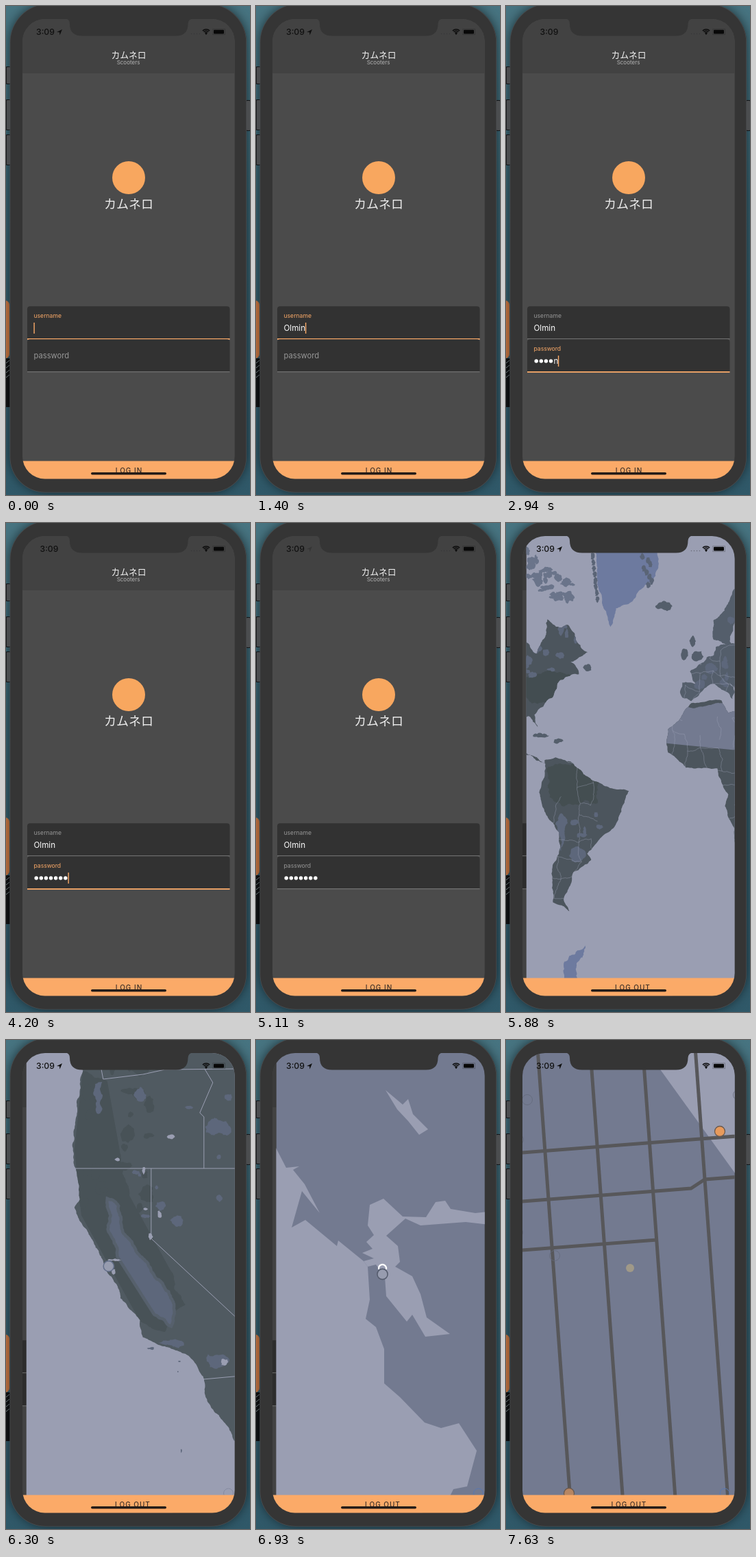
Recreate the animation shown at these times as an HTML page with a canvas. Size 356 by 712 pixels, loop 7700 ms.

```html
<!DOCTYPE html>
<html lang="en">
<head>
<meta charset="utf-8">
<title>Scooter login</title>
<style>
html, body { margin: 0; width: 100%; height: 100%; overflow: hidden; background: #345c69; }
canvas { display: block; width: 356px; height: 712px; }
</style>
</head>
<body>
<canvas id="stage"></canvas>
<script>
const LOOP = 7700, STEP = 70;
const BRAND = 'カムネロ', USER = 'Olmin', PASS = USER + '12';
const UI = 'Inter, Roboto, sans-serif', JP = '"Noto Sans CJK JP", "Noto Sans CJK", sans-serif';
const ORANGE = '#fbaa68', SEA = '#9a9eb2', HAZE = '#737a90', ICE = '#6d7a9f';
const LAND = '#4c555d', MOSS = '#485257', HILL = '#5d677b', BEZEL = '#353535';

const canvas = document.getElementById('stage');
const ratio = window.devicePixelRatio || 1;
canvas.width = 356 * ratio;
canvas.height = 712 * ratio;
const g = canvas.getContext('2d');

// ---------- helpers ----------
const clamp = v => Math.max(0, Math.min(1, v));
const ramp = (t, a, b) => clamp((t - a) / (b - a));
const easeOut = u => 1 - Math.pow(1 - u, 3);
const range = (n, f) => Array.from({ length: n }, (_, i) => f(i));

function track(t, keys) {
  const i = Math.max(1, keys.findIndex(k => t < k[0]));
  const [a, from] = keys[i - 1], [b, to] = keys[i];
  return t >= keys.at(-1)[0] ? keys.at(-1)[1] : from + (to - from) * ramp(t, a, b);
}

function box(x, y, w, h, color, r = 0) {
  g.fillStyle = color;
  g.beginPath();
  g.roundRect(x, y, w, h, r);
  g.fill();
}

function dot(x, y, r, color, edge, width = 1) {
  g.beginPath();
  g.arc(x, y, r, 0, 7);
  if (color) { g.fillStyle = color; g.fill(); }
  if (edge) { g.strokeStyle = edge; g.lineWidth = width; g.stroke(); }
}

function text(s, x, y, size, color, { align = 'left', weight = 400, font = UI, gap = 0 } = {}) {
  g.font = `${weight} ${size}px ${font}`;
  g.letterSpacing = gap + 'px';
  g.textAlign = align;
  g.fillStyle = color;
  g.fillText(s, x, y);
  g.letterSpacing = '0px';
  return g.measureText(s).width;
}

const fill = (path, color) => { g.fillStyle = color; g.fill(path); };
function stroke(path, color, width) {
  g.strokeStyle = color;
  g.lineWidth = width;
  g.stroke(path);
}
function inside(path, draw) {
  g.save();
  g.clip(path);
  draw();
  g.restore();
}

// ---------- map shapes ----------
let seed = 90210;
const rnd = () => (seed = seed * 16807 % 2147483647) / 2147483647;
const spread = r => (rnd() - .5) * 2 * r;

// Midpoint displacement turns a side into a coast; long off-stage sides stay straight.
function jag([x, y], [u, v], rough) {
  const dx = u - x, dy = v - y, len = Math.hypot(dx, dy);
  if (!rough || len < 3 || len > 90) return [[x, y]];
  const k = spread(rough), mid = [x + dx / 2 - dy * k, y + dy / 2 + dx * k];
  return [...jag([x, y], mid, rough), ...jag(mid, [u, v], rough)];
}
function outline(pts, rough) {
  const all = pts.flatMap((p, i) => jag(p, pts[(i + 1) % pts.length], rough));
  return new Path2D('M' + all.join(' ') + 'Z');
}
const shape = (s, rough = 0) => outline(s.split(' ').map(p => p.split(',').map(Number)), rough);
const line = s => new Path2D('M' + s);

function blob(x, y, rx, ry = rx, rough = .2) {
  const pts = range(8, i => {
    const a = i * Math.PI / 4, k = 1 + spread(.25);
    return [x + Math.cos(a) * rx * k, y + Math.sin(a) * ry * k];
  });
  return outline(pts, rough);
}
const scatter = (n, x, y, w, h, size) =>
  range(n, () => blob(x + rnd() * w, y + rnd() * h, size * (.4 + rnd()), size * (.4 + rnd())));

// Country borders: a wobbly lattice with some sides left out.
function lattice(x, y, cols, rows, cell) {
  const nodes = range(rows, r => range(cols, c => [x + c * cell + spread(cell / 3), y + r * cell + spread(cell / 3)]));
  const path = new Path2D();
  const link = (a, b) => {
    if (b && rnd() < .65) path.addPath(new Path2D('M' + [...jag(a, b, .12), b].join(' ')));
  };
  nodes.forEach((row, r) => row.forEach((n, c) => {
    link(n, row[c + 1]);
    link(n, nodes[r + 1]?.[c]);
  }));
  return path;
}

const america = shape('30,174 44,190 57,165 60,140 78,152 90,148 104,174 119,188 94,202 106,220 74,236 54,267 41,279 46,297 33,281 5,290 -6,312 28,307 24,322 45,346 58,350 28,338 -42,302 -79,252 -85,208 -170,150 -180,69 2,86', .14);
const south = shape('56,345 72,341 94,347 120,370 140,380 179,390 168,420 158,442 140,456 118,481 124,490 98,508 84,546 92,565 68,552 66,510 77,450 48,392', .1);
const africa = shape('270,262 314,258 324,276 380,277 410,336 432,336 396,382 398,412 366,474 338,480 319,412 324,395 308,357 262,356 236,334 236,300', .08);
const europe = shape('257,232 276,234 268,216 303,192 306,180 336,176 380,150 400,80 500,90 500,280 412,333 390,275 352,258 326,232 334,246 330,256 304,234 270,259 257,254', .14);
const north = shape('303,170 302,142 334,95 390,85 345,130 328,178', .14);
const islands = [blob(272, 172, 4, 10), blob(278, 194, 8, 9), blob(259, 190, 5, 8), blob(230, 121, 12, 7), blob(49, 309, 13, 3), blob(76, 317, 8, 3), blob(119, 210, 6, 5)];
const arctic = range(34, () => {
  const u = rnd();
  return blob(30 + u * 68, 62 + u * 48 + spread(24 - u * 8), 3 + rnd() * 7, 2 + rnd() * 5, .3);
});
const greenland = shape('122,20 134,92 152,151 160,124 214,84 216,20', .12);
const fringe = range(16, i => blob(i < 8 ? 126 + i : 204 + spread(10), 48 + (i % 8) * (i < 8 ? 9 : 6), 3, 5, .3));
const peninsula = shape('116,614 103,640 106,670 84,670 92,630', .2);
const sahara = shape('228,288 262,268 316,262 420,280 400,328 330,330 228,320', .08);
const woods = blob(62, 235, 38, 26), jungle = blob(98, 382, 46, 34);
const andes = blob(80, 450, 5, 34), plains = blob(104, 484, 11, 11);
const worldHills = [...scatter(14, 24, 145, 90, 80, 6), ...scatter(14, 280, 100, 60, 150, 6), ...scatter(6, 90, 400, 60, 60, 5)];
const southBorders = lattice(48, 350, 4, 8, 27), africaBorders = lattice(236, 282, 7, 8, 25), europeBorders = lattice(258, 180, 8, 5, 20);

const west = shape('110,19 109,70 97,155 102,187 108,232 100,244 117,275 140,318 156,348 167,376 196,408 200,433 234,447 262,457 288,490 300,536 334,584 480,760 1500,1300 1500,-900 60,-900 90,-100', .1);
const ranges = shape('112,45 148,60 166,160 180,226 240,335 262,385 232,425 196,410 110,255 100,160', .12);
const valley = shape('150,234 162,242 172,285 215,345 243,385 240,414 218,398 165,315', .12);
const westMoss = scatter(22, 110, 30, 110, 220, 9);
const westHills = [blob(135, 80, 7, 24), blob(308, 126, 22, 12), blob(244, 441, 20, 5), blob(308, 468, 15, 12), blob(196, 80, 8, 13), blob(250, 262, 9, 8), ...scatter(9, 190, 50, 140, 220, 5)];
const lakes = [blob(211, 286, 3, 5), blob(224, 254, 3, 6), blob(241, 141, 6, 3), blob(163, 174, 4, 3), blob(201, 190, 2, 6), blob(204, 246, 3, 2), blob(319, 469, 5, 5), blob(158, 320, 10, 1.5), blob(157, 337, 3, 4)];
const isles = [blob(212, 449, 5, 1.5), blob(253, 468, 2, 1), blob(251, 483, 1, 1), blob(256, 598, 1, 3)];
const stateLines = ['102,187 900,187', '212,187 212,289 420,482', '289,187 289,112 283,106 302,62 290,42', '138,36 142,57 200,50 232,43 334,42', '288,494 420,482'].map(line);

const ocean = shape('-3000,-900 -100,-40 29,157 44,186 63,184 54,189 71,210 93,252 67,220 52,273 72,262 118,300 120,292 157,322 163,330 166,378 160,406 175,418 187,450 187,500 210,520 246,557 270,565 296,558 322,598 308,650 288,654 282,666 400,900 900,1600 -3000,1600');
const bay = shape('157,322 172,318 155,310 170,304 161,294 172,284 163,270 166,240 186,231 214,257 248,258 262,236 276,234 284,246 320,252 600,220 600,300 306,265 240,270 218,260 190,285 207,300 210,323 203,330 228,344 240,370 249,404 283,428 247,432 228,400 220,410 190,373 188,345 175,327 163,330');
const lake = shape('189,73 214,94 222,86 229,108 251,130 238,138 222,118 206,101');

const rowY = (x, i) => 164 + 71 * i - .077 * (x - 24) - (i === 1 ? 11.5 * ramp(x, 270, 290) : 0);
const streets = [
  ...range(4, i => line(`${3 + 76.7 * i},-580 ${120 + 76.7 * i},1030`)),
  ...range(3, i => line((i < 2 ? [-400, 270, 290, 800] : [-400, 220]).map(x => [x, rowY(x, i)]).join(' ')))
];

function drawWorld(k) {
  const edge = 'rgba(160,166,186,.55)';
  const paint = (list, color) => list.forEach(p => fill(p, color));
  paint([america, south, africa], LAND);
  paint([europe, north, ...islands], '#545e6b');
  inside(america, () => fill(woods, '#434d51'));
  inside(south, () => {
    fill(jungle, '#444e51');
    paint([andes, plains], HILL);
    stroke(southBorders, edge, .7 / k);
  });
  [america, europe, north, south].forEach(p => inside(p, () => paint(worldHills, HILL)));
  inside(africa, () => {
    fill(sahara, HAZE);
    stroke(africaBorders, edge, .7 / k);
  });
  inside(europe, () => stroke(europeBorders, edge, .7 / k));
  paint(arctic, '#6a748a');
  paint([greenland, peninsula], ICE);
  paint(fringe, '#5a6476');
}

function drawWest(k) {
  fill(west, '#505a61');
  inside(west, () => {
    [ranges, ...westMoss].forEach(p => fill(p, MOSS));
    stroke(valley, '#56606c', 9);
    [valley, ...westHills].forEach(p => fill(p, HILL));
  });
  lakes.forEach(p => fill(p, SEA));
  isles.forEach(p => fill(p, HILL));
  stateLines.forEach(p => stroke(p, SEA, 1 / k));
}

const drawBay = () => [ocean, bay, lake].forEach(p => fill(p, SEA));
const drawStreets = k => streets.forEach(p => stroke(p, '#57575a', 5 / Math.sqrt(k)));

// Draws a map whose city sits at (ax, ay) when the zoom equals `base`.
function layer(ax, ay, base, pos, zoom, draw) {
  const k = Math.pow(2, zoom - base);
  g.save();
  g.translate(pos.x, pos.y);
  g.scale(k, k);
  g.translate(-ax, -ay);
  draw(k);
  g.restore();
}

function drawMarkers(pos, zoom) {
  const k = Math.pow(2, zoom - 16), near = ramp(zoom, 10, 14), close = zoom > 6.4;
  const at = (x, y) => [pos.x + (x - 179) * k, pos.y + (y - 341) * k];
  if (near > 0) {
    g.globalAlpha = near;
    [[31, 87], [339, 80], [18, 145], [17, 280], [71, 314]].forEach(p => dot(...at(...p), 7.5, null, '#646a7c', .8));
    dot(...at(312, 133), 7.5, '#e79a5c', '#69594f', 1.3);
    dot(...at(92, 660), 7.5, '#b78662', '#69594f', 1.3);
    dot(pos.x + 2, pos.y - 9, 6, '#a09988');
  }
  g.globalAlpha = ramp(zoom, 2.5, 3.5) * (1 - near);
  if (close) {
    g.strokeStyle = '#fff';
    g.lineWidth = 2.3;
    g.beginPath();
    g.arc(pos.x, pos.y - 8.5, 5.6, Math.PI * .92, Math.PI * 2.08);
    g.stroke();
  }
  dot(pos.x, pos.y, 7.6, '#979caf', close ? '#565d6e' : '#65718c', 1.6);
  g.globalAlpha = 1;
}

function drawMap(t, off) {
  const zoom = track(t, [[5600, 1], [5880, 1.05], [6300, 4.18], [6650, 6.6], [6860, 6.6], [6930, 7.26], [7630, 16]]);
  const rest = 1 - track(t, [[5600, 0], [5880, .27], [6300, .989], [6510, 1]]);
  const deg = 512 * Math.pow(2, zoom) / 360;
  const pos = { x: 179 + off - rest * 122.4 * deg, y: 341 - rest * 40.87 * deg };
  const frame = new Path2D();
  frame.rect(24 + off, 19, 310, 644);
  inside(frame, () => {
    fill(frame, zoom < 5.9 ? SEA : HAZE);
    if (zoom < 2.7) layer(-79, 253, 1.05, pos, zoom, drawWorld);
    else if (zoom < 5.9) layer(150, 329.4, 4.18, pos, zoom, drawWest);
    else layer(184.5, 341, 7.26, pos, zoom, drawBay);
    g.globalAlpha = ramp(zoom, 13.5, 15);
    if (zoom > 13.5) layer(179, 341, 16, pos, zoom, drawStreets);
    g.globalAlpha = 1;
    drawMarkers(pos, zoom);
    if (zoom > 3) dot(319 + off, 660, 7, null, zoom > 6.4 ? '#5877b0' : '#858aa0');
  });
}

// ---------- screens ----------
function button(label, off) {
  box(24, 662.4, 310, 27, ORANGE);
  text(label, 179.5 + off, 679.6, 10, '#3c2f27', { align: 'center', weight: 500, gap: 1 });
}

function field(y, label, focus, lift) {
  box(31, y, 295.5, 48, '#323232', [4, 4, 0, 0]);
  box(31, y + 47, 295.5, 1, '#858585');
  if (focus) box(31, y + 46.7, 295.5, 1.8, ORANGE);
  text(label, 40.5, y + 28 - 11.3 * lift, 11.2 - 2.6 * lift, focus ? ORANGE : '#979797');
}

const typedBy = (t, start, gap, max) => Math.max(0, Math.min(max, Math.floor((t - start) / gap) + 1));

function drawLogin(t) {
  box(24, 19, 310, 671, '#4b4b4b');
  box(24, 19, 310, 79, '#424242');
  text(BRAND, 179, 75.5, 12.75, '#f4f4f4', { align: 'center', font: JP });
  text('Scooters', 178.5, 85, 8, '#b4b4b4', { align: 'center' });
  dot(179, 250, 24, '#f8a75f');
  text(BRAND, 179, 294.5, 18, '#ececec', { align: 'center', font: JP, weight: 300 });

  const onUser = t < 1750, onPass = !onUser && t < 4760;
  const typed = typedBy(t, 420, 210, USER.length), keys = typedBy(t, 1820, 280, PASS.length);
  field(437.2, 'username', onUser, 1);
  field(485.2, 'password', onPass, ramp(t, 1750, 1890));

  // The newest password letter stays readable for a moment.
  let caret = 41 + text(USER.slice(0, typed), 40.5, 473, 11.6, '#fff');
  if (!onUser) {
    const open = keys > 0 && t < 4060 ? 1 : 0;
    const hidden = keys - open;
    range(hidden, i => dot(44.2 + i * 7.1, 517, 2.75, '#fff'));
    caret = 41 + hidden * 7.15;
    if (open) caret += text(PASS[hidden], caret, 521, 11.6, '#fff');
  }
  const lit = t < 4000 || (t + 100) % 1000 < 600;
  if (lit && (onUser || onPass)) box(caret - .6, onUser ? 461 : 509, 1.4, 16, ORANGE);
}

function statusBar(t) {
  const arrow = t < 3000 ? 1 - ramp(t, 1400, 1610) : ramp(t, 5040, 5320);
  text('3:09', arrow > 0 ? 44 : 49.5, 42, 12.2, '#101010', { weight: 500 });
  g.globalAlpha = arrow;
  fill(line('74,38 82,34 78.5,42.5 78,38.3Z'), '#101010');
  g.globalAlpha = 1;
  if (t < 6200) range(4, i => dot(270.5 + i * 4, 40.5, .8, 'rgba(40,40,48,.45)'));
  g.strokeStyle = '#0c0c0c';
  g.lineWidth = 1.6;
  range(3, i => {
    g.beginPath();
    g.arc(292, 41.2, 2.4 + i * 2.4, -2.35, -.79);
    g.stroke();
  });
  dot(292, 40.4, 1.2, '#0c0c0c');
  box(303, 34.8, 15, 5.8, '#080808', 1.3);
  g.strokeStyle = 'rgba(20,20,20,.3)';
  g.lineWidth = .8;
  g.strokeRect(301.8, 33.7, 17.6, 8);
}

function backdrop() {
  const sky = g.createLinearGradient(0, 0, 0, 712);
  sky.addColorStop(0, '#477481');
  sky.addColorStop(.4, '#386270');
  sky.addColorStop(1, '#2f5868');
  g.fillStyle = sky;
  g.fillRect(0, 0, 356, 712);
  box(-10, 429, 15, 84, '#cd7a45', 6);
  box(0, 513, 6, 71, '#101214');
  range(4, i => stroke(line(`0,${520 + i * 7} 5,${516 + i * 7}`), '#7d898d', 1));
  g.save();
  g.shadowColor = 'rgba(0,0,0,.6)';
  g.shadowBlur = 16 * ratio;
  box(6, -3, 345, 711, BEZEL, 56);
  g.restore();
  [[0, 88, 26], [0, 136, 45], [0, 187, 45], [350, 137, 45]].forEach(([x, y, h]) => {
    box(x, y, 7, h, '#141618', 1);
    box(x + 1, y + 1, 5, h - 2, '#4b4d4f', 1);
  });
  box(5.5, -3.5, 345.5, 712, '#4c4e50', [57, 57, 52, 52]);
  box(6.3, -2.7, 344, 710.4, BEZEL, [56, 56, 51, 51]);
}

function render(time) {
  const t = Math.floor(time % LOOP / STEP) * STEP;
  g.setTransform(ratio, 0, 0, ratio, 0, 0);
  backdrop();

  const screen = new Path2D();
  screen.roundRect(24, 19, 309.7, 669.6, 33);
  inside(screen, () => {
    const off = t < 5600 ? 310 - 304.5 * easeOut(ramp(t, 5180, 5600)) : 5.5 * (1 - ramp(t, 6930, 7140));
    const push = 1 - off / 310;
    if (off > 0) {
      g.save();
      g.translate(-93 * push, 0);
      drawLogin(t);
      g.restore();
      box(24, 19, 310, 644, `rgba(0,0,0,${.12 * push})`);
    }
    if (push > 0) drawMap(t, off);
    button(push > 0 ? 'LOG OUT' : 'LOG IN', push > 0 ? off : 0);
    statusBar(t);
  });

  fill(line('86,18 Q93,19 93,26 Q93,43.5 111,43.5 H248 Q265.5,43.5 265.5,26 Q266,19 273,18Z'), BEZEL);
  box(124, 679, 110, 3.6, '#241c18', 1.8);
}

const start = performance.now();
function loop(now) {
  render(Math.max(0, now - start));
  requestAnimationFrame(loop);
}
render(0);
requestAnimationFrame(loop);
</script>
</body>
</html>
```
